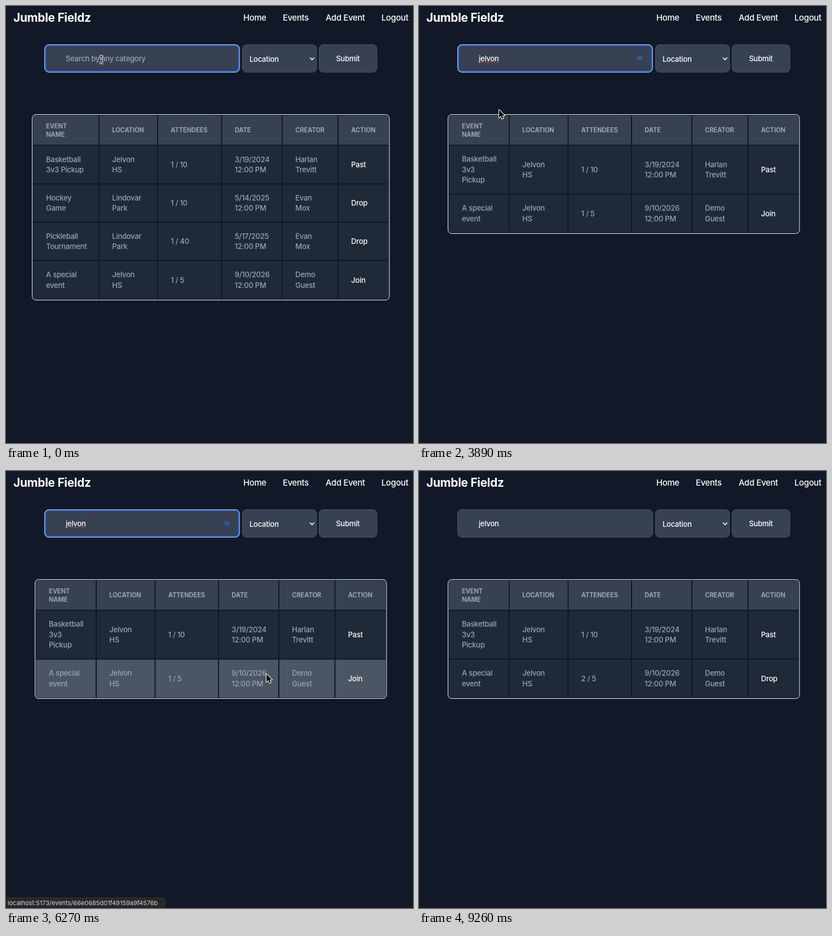
These frames come from a looping animation (722x775 px, 9880 ms). An HTML page with a canvas:

```html
<!DOCTYPE html>
<html lang="en">
<head>
<meta charset="utf-8">
<title>Event search</title>
<style>
  html, body { margin: 0; width: 100%; height: 100%; overflow: hidden; background: #111827; }
  canvas { display: block; width: 722px; height: 775px; }
</style>
</head>
<body>
<canvas id="stage" width="722" height="775"></canvas>
<script>
const ctx = document.getElementById('stage').getContext('2d');
const LOOP = 9880;
const BG = '#111827', PANEL = '#374151', ROW = '#1f2937', HOVER = '#4b5563', GREY = '#9ca3af';
const FAMILY = 'Inter, "Liberation Sans", sans-serif';

const FONT = {
  logo: ['700 20.8px', -0.25],
  nav: ['500 14.8px', -0.28],
  body: ['450 12.95px', -0.23],
  strong: ['500 12.95px', -0.2],
  head: ['700 11.1px', -0.1],
  status: ['400 11px', 0]
};

const HEADS = [['EVENT', 'NAME'], ['LOCATION'], ['ATTENDEES'], ['DATE'], ['CREATOR'], ['ACTION']];
const noon = day => [day, '12:00 PM'];
const school = ['Jelvon', 'HS'], park = ['Lindovar', 'Park'];

const fullTable = {
  cols: [47, 165, 269, 382.5, 490, 589, 679.5],
  rows: [193, 247, 315.5, 383.5, 451.5, 521],
  cells: [
    [['Basketball', '3v3 Pickup'], school, ['1 / 10'], noon('3/19/2024'), ['Harlan', 'Trevitt'], ['Past']],
    [['Hockey', 'Game'], park, ['1 / 10'], noon('5/14/2025'), ['Evan', 'Mox'], ['Drop']],
    [['Pickleball', 'Tournament'], park, ['1 / 40'], noon('5/17/2025'), ['Evan', 'Mox'], ['Drop']],
    [['A special', 'event'], school, ['1 / 5'], noon('9/10/2026'), ['Demo', 'Guest'], ['Join']]
  ]
};

const foundTable = joined => ({
  cols: [52, 160, 264.5, 377, 484, 583.5, 674.5],
  rows: [193, 247, 333.5, 403],
  cells: [
    [['Basketball', '3v3', 'Pickup'], school, ['1 / 10'], noon('3/19/2024'), ['Harlan', 'Trevitt'], ['Past']],
    [['A special', 'event'], school, [joined ? '2 / 5' : '1 / 5'], noon('9/10/2026'), ['Demo', 'Guest'],
      [joined ? 'Drop' : 'Join']]
  ]
});

const TYPED = [[0, ''], [140, 'j'], [290, 'jel'], [1040, 'jelv'], [1190, 'jelvo'], [1490, 'jelvon']];
const CARET = [[140, 890], [1040, 1940], [2540, 2990], [3440, 3890], [4480, 4930],
  [5530, 5970], [6570, 7020], [7460, 7610]];
const POINTER = [
  [0, 'beam', 169, 95], [3740, 'beam', 165, 108], [3890, 'arrow', 142, 184], [4040, 'hand', 120, 278],
  [4180, 'arrow', 112, 334], [4330, 'hand', 107, 354], [4480, 'hand', 105, 358], [4630, 'hand', 104, 360],
  [4780, 'hand', 103, 361], [5970, 'hand', 128, 363], [6120, 'arrow', 292, 362], [6270, 'arrow', 462, 360],
  [6420, 'arrow', 565, 361], [6570, 'arrow', 622, 358], [6720, 'arrow', 646, 362], [6870, 'arrow', 642, 366],
  [7020, 'arrow', 637, 370], [7170, 'hand', 628, 373], [7310, 'hand', 622, 373], [8510, 'hand', 624, 383],
  [8660, 'arrow', 641, 432], [8810, 'arrow', 664, 522], [8960, 'arrow', 686, 632], [9110, 'arrow', 701, 757],
  [9260, 'none', 0, 0]
];

const latest = (list, t) => list.filter(k => k[0] <= t).pop();
const within = (v, a, b) => v >= a && v < b;

function setFont(name) {
  const [face, gap] = FONT[name];
  ctx.font = face + ' ' + FAMILY;
  ctx.letterSpacing = gap + 'px';
}

function text(str, x, y, font, color, align = 'left') {
  setFont(font);
  ctx.fillStyle = color;
  ctx.textAlign = align;
  ctx.fillText(str, x, y);
}

function lines(list, x, mid, step, font, color) {
  const lift = font === 'head' ? 4 : 4.6;
  list.forEach((s, i) => text(s, x, mid + (i - (list.length - 1) / 2) * step + lift, font, color));
}

function box(x, y, w, h, r, fill, stroke, width = 1) {
  ctx.beginPath();
  ctx.roundRect(x, y, w, h, r);
  if (fill) { ctx.fillStyle = fill; ctx.fill(); }
  if (stroke) { ctx.strokeStyle = stroke; ctx.lineWidth = width; ctx.stroke(); }
}

function poly(points, color, width) {
  ctx.beginPath();
  points.forEach(p => ctx.lineTo(...p));
  ctx.strokeStyle = color;
  ctx.lineWidth = width;
  ctx.stroke();
}

function drawHeader() {
  text('Jumble Fieldz', 13, 28, 'logo', '#fff');
  [['Home', 421], ['Events', 491], ['Add Event', 567], ['Logout', 666]]
    .forEach(([s, x]) => text(s, x, 26, 'nav', '#fff'));
}

function drawSearch(t) {
  const focused = t < 7610;
  const word = latest(TYPED, t)[1];
  box(68.5, 68.5, 346, 49, 7.5, PANEL, HOVER);
  if (focused) {
    box(68.7, 68.7, 345.4, 48.6, 7.3, null, '#e4eefc');
    box(70.1, 70.1, 342.6, 45.8, 6, null, '#1c64f2', 1.9);
  }
  if (word) text(word, 106, 98, 'body', '#fff');
  else text('Search by any category', 106, 98, 'body', GREY);

  const end = 106 + ctx.measureText(word).width;
  if (focused && word) {
    poly([[388, 89.5], [395.5, 96]], '#2c63c0', 2.4);
    poly([[395.5, 89.5], [388, 96]], '#2c63c0', 2.4);
  }
  if (focused && t >= 2540) {
    ctx.setLineDash([1.6, 1.4]);
    poly([[106, 100], [end, 100]], '#d8433f', 1.5);
    ctx.setLineDash([]);
  }
  if (CARET.some(([a, b]) => within(t, a, b))) {
    ctx.fillStyle = '#fff';
    ctx.fillRect(Math.round(end), 85, 1, 16);
  }

  box(419.5, 68.5, 131.5, 49, 7.5, PANEL, HOVER);
  text('Location', 432, 98.5, 'strong', '#fff');
  poly([[539.3, 91.5], [543, 95.3], [546.7, 91.5]], '#fff', 1.7);
  box(555.5, 68.5, 102.5, 49, 7.5, PANEL, HOVER);
  text('Submit', 606.5, 98, 'strong', '#fff', 'center');
}

function drawTable({ cols, rows, cells }, hoverRow, hoverAction) {
  const [left, right] = [cols[0], cols[6]];
  const [top, bottom] = [rows[0], rows[rows.length - 1]];
  ctx.save();
  ctx.beginPath();
  ctx.roundRect(left + 1, top + 1, right - left - 2, bottom - top - 2, 4);
  ctx.clip();
  for (let r = 0; r < rows.length - 1; r++) {
    ctx.fillStyle = r === 0 ? PANEL : r - 1 === hoverRow ? HOVER : ROW;
    ctx.fillRect(left, rows[r], right - left, rows[r + 1] - rows[r]);
  }
  cols.slice(1, -1).forEach(x => poly([[x, top], [x, bottom]], BG, 2));
  rows.slice(1, -1).forEach(y => poly([[left, y], [right, y]], BG, 2));
  ctx.restore();
  box(left - .5, top - .5, right - left + 1, bottom - top + 1, 6.5, null, '#f3f4f6');

  const textX = c => cols[c] + (c ? 23.3 : 24);
  HEADS.forEach((h, c) => lines(h, textX(c), 220, 15, 'head', GREY));
  cells.forEach((row, r) => {
    const mid = r + 2 === rows.length - 1 ? rows[r + 1] + 34.5 : (rows[r + 1] + rows[r + 2]) / 2;
    row.forEach((cell, c) => {
      const action = c === 5;
      const color = !action ? GREY : hoverAction && r === hoverRow ? '#3f83f8' : '#fff';
      lines(cell, textX(c), mid, 18.5, action ? 'strong' : 'body', color);
    });
  });
}

function drawStatus(t) {
  const alpha = Math.min((t - 4330) / 300, (6570 - t) / 300, 1);
  if (alpha <= 0) return;
  ctx.globalAlpha = alpha;
  box(-2, 757, 284, 20, [0, 4, 0, 0], '#282827', '#3a3a3a');
  text('localhost:5173/events/66e0685d01f49159a9f4576b', 3, 770, 'status', '#d5d7da');
  ctx.globalAlpha = 1;
}

const SHAPES = {
  arrow: new Path2D('M0 0V14L3.2 11L5.4 16L7.8 15L5.6 10.2H10Z'),
  hand: new Path2D('M-2 1.2Q-.6-.4.6 1.2L2 5Q3.4 4 4.4 5.2Q5.8 4.4 6.6 5.8Q8.2 5.2 8.6 7V10.5' +
    'L7 14.6H.4L-1.6 11.6L-4.6 8.8Q-4.8 7.2-3 7.4L-.8 8.6Z')
};

function drawPointer([, kind, x, y]) {
  if (kind === 'none') return;
  ctx.save();
  ctx.translate(x, y);
  ctx.lineJoin = 'round';
  if (kind === 'beam') {
    for (const [color, width] of [['#fff', 3.4], ['#1b1f27', 1.3]]) {
      poly([[-3.5, -6.5], [-1.2, -6], [0, -4.5], [1.2, -6], [3.5, -6.5]], color, width);
      poly([[-3.5, 6.5], [-1.2, 6], [0, 4.5], [1.2, 6], [3.5, 6.5]], color, width);
      poly([[0, -5], [0, 5]], color, width);
      poly([[-2, 2], [2, 2]], color, width);
    }
  } else {
    const hand = kind === 'hand';
    ctx.strokeStyle = hand ? '#111' : '#fff';
    ctx.lineWidth = hand ? 1.3 : 2;
    ctx.fillStyle = hand ? '#fff' : '#0b0b0b';
    ctx.stroke(SHAPES[kind]);
    ctx.fill(SHAPES[kind]);
    if (hand) for (const i of [1.4, 3.6, 5.8]) poly([[i, 9.5], [i, 12.5]], '#333', .8);
  }
  ctx.restore();
}

function draw(t) {
  ctx.fillStyle = BG;
  ctx.fillRect(0, 0, 722, 775);
  drawHeader();
  drawSearch(t);
  const pointer = latest(POINTER, t);
  const [, kind, x, y] = pointer;
  if (t < 2540) drawTable(fullTable, -1, false);
  else {
    const row = within(y, 248, 335) ? 0 : within(y, 335, 403) ? 1 : -1;
    drawTable(foundTable(t >= 7910), row, kind === 'hand' && within(x, 604, 633) && y < 378);
  }
  drawStatus(t);
  drawPointer(pointer);
}

const start = performance.now();
function tick() {
  draw((performance.now() - start) % LOOP);
  requestAnimationFrame(tick);
}
tick();
</script>
</body>
</html>
```
